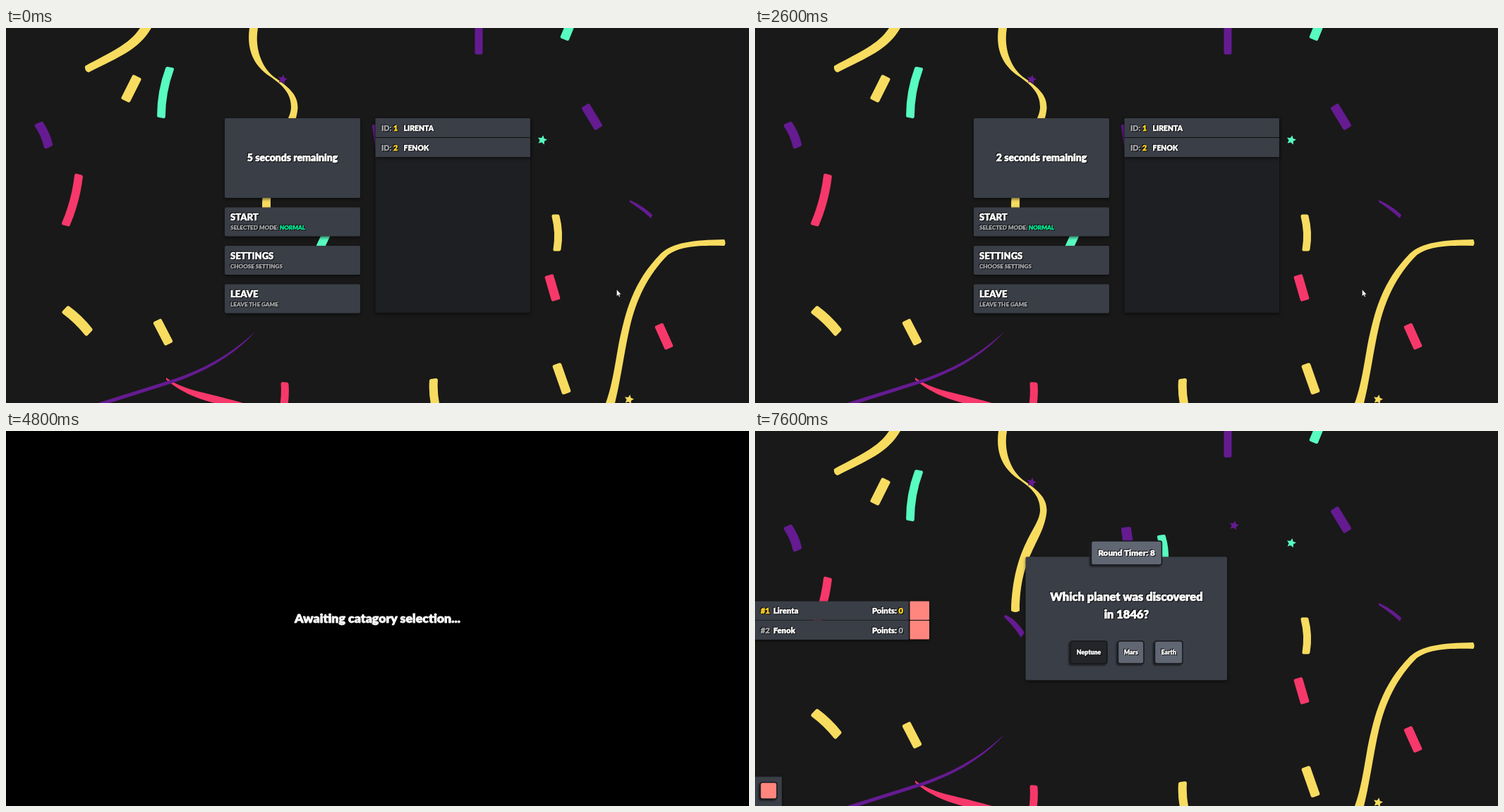
Write an HTML page that moves like this. It is 1053 px wide and 532 px high and loops after 8 s.

```html
<!DOCTYPE html>
<html lang="en">
<head>
<meta charset="utf-8">
<title>Quiz lobby</title>
<style>
html, body { margin: 0; width: 100%; height: 100%; overflow: hidden; background: #191919; }
svg { display: block; width: 100vw; height: 100vh; }
text { font-family: Lato, "Open Sans", sans-serif; font-weight: 900; white-space: pre; }
text, tspan { fill: currentColor; stroke: currentColor; stroke-width: .045em; stroke-linejoin: round; }
.outlined { filter: drop-shadow(1px 1px 0 #08090b) drop-shadow(-.6px -.4px 0 #08090b); }
.raised { filter: drop-shadow(0 2px 2px #0008); }
.key { stroke: #17191d; stroke-width: 1.5px; filter: drop-shadow(-2px 2px 1px #1d1f24); }
</style>
</head>
<body>
<svg id="stage" viewBox="0 0 1053 532" preserveAspectRatio="none"></svg>
<script>
const LOOP = 8000;
const YELLOW = '#f8dc60', PURPLE = '#651b91', TEAL = '#58fcc0', PINK = '#f7386a';
const SLATE = '#3a3e46', KEY = '#606672', SALMON = '#ff867e', GOLD = '#ffd51e', GREY = '#a2a4a8';

// A short paper strip: two ends, a width and a sideways bend.
function strip(color, x1, y1, x2, y2, width, bend = 0) {
  const length = Math.hypot(x2 - x1, y2 - y1);
  const nx = (y1 - y2) / length, ny = (x2 - x1) / length, half = width / 2 - 2.5;
  const at = (x, y, d) => `${(x + nx * d).toFixed(1)} ${(y + ny * d).toFixed(1)}`;
  const mx = (x1 + x2) / 2, my = (y1 + y2) / 2;
  return `<path fill="${color}" stroke="${color}" stroke-width="5" stroke-linejoin="round"
    d="M${at(x1, y1, half)}Q${at(mx, my, bend + half)} ${at(x2, y2, half)}
    L${at(x2, y2, -half)}Q${at(mx, my, bend - half)} ${at(x1, y1, -half)}Z"/>`;
}

function star(color, x, y) {
  const points = Array.from({ length: 10 }, (_, i) => {
    const a = i * Math.PI / 5 - 1.35, r = i % 2 ? 3.4 : 7;
    return `${(x + r * Math.cos(a)).toFixed(1)},${(y + r * Math.sin(a)).toFixed(1)}`;
  });
  return `<polygon fill="${color}" points="${points.join(' ')}"/>`;
}

const shape = (color, d) => `<path fill="${color}" d="${d}"/>`;
const box = (x, y, w, h, fill, cls = '', r = 2, id = '') =>
  `<rect id="${id}" x="${x}" y="${y}" width="${w}" height="${h}" rx="${r}" fill="${fill}" class="${cls}"/>`;
const label = (x, y, size, str, { color = '#fff', anchor = 'start', id = '', cls = 'outlined' } = {}) =>
  `<text id="${id}" x="${x}" y="${y}" font-size="${size}" color="${color}" text-anchor="${anchor}" class="${cls}">${str}</text>`;
const tint = (color, str) => `<tspan color="${color}">${str}</tspan>`;
const centered = { anchor: 'middle' };

const confetti = [
  shape(YELLOW, 'M190 0C174 24 148 34 112 54Q111 61 117 63C160 41 188 31 206 0Z'),
  shape(YELLOW, `M345 0C341 30 350 52 373 68C394 82 404 94 404 112C404 138 366 160 363 255
    Q369 259 375 255C375 178 407 158 413 118C416 98 404 86 382 71C362 57 352 28 357 0Z`),
  shape(YELLOW, `M1018 300C972 301 946 304 928 320C888 361 878 402 868 450C862 485 858 510 850 532
    H863C873 490 876 460 884 425C893 385 910 350 938 322C955 310 980 308 1018 309Q1021 305 1018 300Z`),
  shape(PINK, 'M227 496C250 514 285 517 336 532H295C265 524 245 514 227 499Z'),
  shape(PURPLE, 'M354 430C320 462 280 485 232 500L130 532H147L235 504C285 487 325 463 354 430Z'),
  shape(PURPLE, 'M884 244Q901 251 916 265L914 270Q900 257 884 247Z'),
  shape(PURPLE, 'M354 261Q367 264 382 286L377 293Q367 277 353 264Z'),
  strip(YELLOW, 185, 71, 170, 101, 14),
  strip(YELLOW, 85, 400, 117, 431, 14, -3),
  strip(YELLOW, 215, 417, 230, 446, 13),
  strip(YELLOW, 779, 267, 781, 314, 11, -5),
  strip(YELLOW, 781, 479, 794, 516, 13),
  strip(YELLOW, 606, 500, 611, 545, 12, 4),
  strip(PURPLE, 47, 137, 60, 167, 13, -3),
  strip(PURPLE, 822, 112, 839, 140, 13),
  strip(PURPLE, 670, -6, 670, 35, 11),
  strip(PURPLE, 526, 139, 531, 174, 14),
  strip(TEAL, 232, 58, 220, 125, 12, 6),
  strip(TEAL, 801, -8, 792, 14, 13),
  strip(TEAL, 576, 150, 580, 185, 12, -3),
  strip(TEAL, 456, 288, 443, 316, 12),
  strip(PINK, 103, 210, 85, 278, 12, -5),
  strip(PINK, 770, 353, 779, 384, 13),
  strip(PINK, 926, 423, 939, 452, 13),
  strip(PINK, 395, 505, 392, 545, 11, -3),
  star(PURPLE, 392, 73), star(PURPLE, 679, 134), star(TEAL, 760, 159), star(YELLOW, 883, 527)
].join('');

const menuItem = (y, title, note) =>
  box(310, y, 192, 41, SLATE, 'raised') + label(318, y + 18.5, 13, title) +
  label(318, y + 31.5, 8.1, note, { color: GREY });

const listRow = (y, id, name) =>
  box(523.5, y, 219.5, 27, SLATE, 'raised', 1) +
  label(532, y + 17.8, 10.8, `ID: ${tint(GOLD, id)}`, { color: GREY }) +
  label(563.5, y + 17.8, 10.4, name);

const scoreRow = (y, rank, name, color) =>
  box(-4, y, 222, 27, SLATE, 'raised', 1) + box(219.5, y, 27.5, 26.5, SALMON, 'raised', 1) +
  label(8, y + 17.5, 11.2, rank, { color }) + label(26, y + 17.5, 11.2, name) +
  label(210, y + 17.5, 11.2, `Points: ${tint(color, '0')}`, { anchor: 'end' });

const answer = (x, w, str, id = '') =>
  box(x, 298, w, 32, KEY, 'key', 3, id) + label(x + w / 2, 316.5, 8.8, str, centered);

const lobby = box(310, 128, 192, 113, SLATE, 'raised') +
  label(406, 188.5, 14, '', { ...centered, id: 'countdown' }) +
  menuItem(254.5, 'START', `SELECTED MODE: ${tint('#00f59b', 'NORMAL')}`) +
  menuItem(309, 'SETTINGS', 'CHOOSE SETTINGS') +
  menuItem(363.5, 'LEAVE', 'LEAVE THE GAME') +
  box(523.5, 128, 219.5, 276, '#1e1f23', 'raised') +
  listRow(128, '1', 'LIRENTA') + listRow(156, '2', 'FENOK');

const waiting = '<rect width="1053" height="532"/>' +
  label(526.5, 271.5, 17.8, 'Awaiting catagory selection...', { ...centered, cls: '' });

const quiz = scoreRow(241.5, '#1', 'Lirenta', GOLD) + scoreRow(269, '#2', 'Fenok', GREY) +
  box(383.5, 178.5, 285.5, 175, SLATE, 'raised') +
  box(474, 156, 105, 34, KEY, 'key', 3, 'tag') +
  label(526.5, 177, 11.8, '', { ...centered, id: 'timer' }) +
  label(526.5, 240.5, 16.5, 'Which planet was discovered', centered) +
  label(526.5, 266, 16.5, 'in 1846?', centered) +
  answer(447, 52, 'Neptune', 'neptune') + answer(514.5, 36.5, 'Mars') + answer(566.5, 39.5, 'Earth') +
  box(-4, 490.5, 20, 46, SLATE, 'raised', 1, 'tray') + box(7.5, 498.5, 23.5, 23.5, SALMON, 'key', 3, 'chip');

document.getElementById('stage').innerHTML =
  `<rect width="1053" height="532" fill="#191919"/>${confetti}
  <g id="lobby">${lobby}</g><g id="waiting">${waiting}</g><g id="quiz">${quiz}</g>
  <path id="cursor" d="M.5 0V9.5L2.6 7.6L4 10.6L5.4 10L4.1 7H6.8Z" fill="#fff" stroke="#111" stroke-width=".4"/>`;

const $ = Object.fromEntries(
  ['lobby', 'waiting', 'quiz', 'countdown', 'tag', 'timer', 'neptune', 'tray', 'chip', 'cursor']
    .map(id => [id, document.getElementById(id)]));
const show = (el, on) => el.setAttribute('display', on ? 'inline' : 'none');

// Pointer visits: [time, x, y]; it is off the stage between them.
const visits = [
  [[0, 865, 371], [2400, 865, 371], [2600, 860, 371], [4060, 860, 371], [4130, 828, 303],
   [4200, 757, 284], [4400, 660, 292], [4560, 740, 310], [4800, 1053, 330]],
  [[5930, 779, 250], [6200, 640, 285], [6530, 485, 316], [6730, 474, 318],
   [6870, 476, 319], [7130, 650, 345], [7330, 905, 390]]
];

function pointerAt(t) {
  const path = visits.find(v => t >= v[0][0] && t < v[v.length - 1][0]);
  if (!path) return null;
  const i = path.findIndex(p => p[0] > t);
  const [t0, x0, y0] = path[i - 1], [t1, x1, y1] = path[i];
  const k = (t - t0) / (t1 - t0);
  return [x0 + (x1 - x0) * k, y0 + (y1 - y0) * k];
}

function render(t) {
  show($.lobby, t < 4200);
  show($.waiting, t >= 4200 && t < 5670);
  show($.quiz, t >= 5670);

  const left = 5 - [130, 1200, 2130, 3200].filter(tick => t >= tick).length;
  $.countdown.textContent = `${left} seconds remaining`;

  const round = 10 - [6600, 7600].filter(tick => t >= tick).length;
  $.timer.textContent = `Round Timer: ${round}`;
  const tagWidth = round > 9 ? 105 : 100;
  $.tag.setAttribute('x', 526.5 - tagWidth / 2);
  $.tag.setAttribute('width', tagWidth);

  const answered = t >= 6800;
  $.neptune.setAttribute('fill', t >= 6730 ? '#232529' : KEY);
  $.tray.setAttribute('width', answered ? 42 : 20);
  show($.chip, answered);

  const pointer = pointerAt(t);
  show($.cursor, pointer);
  if (pointer) $.cursor.setAttribute('transform', `translate(${pointer})`);
}

const start = performance.now();
function tick() {
  render((performance.now() - start) % LOOP);
  requestAnimationFrame(tick);
}
tick();
</script>
</body>
</html>
```
